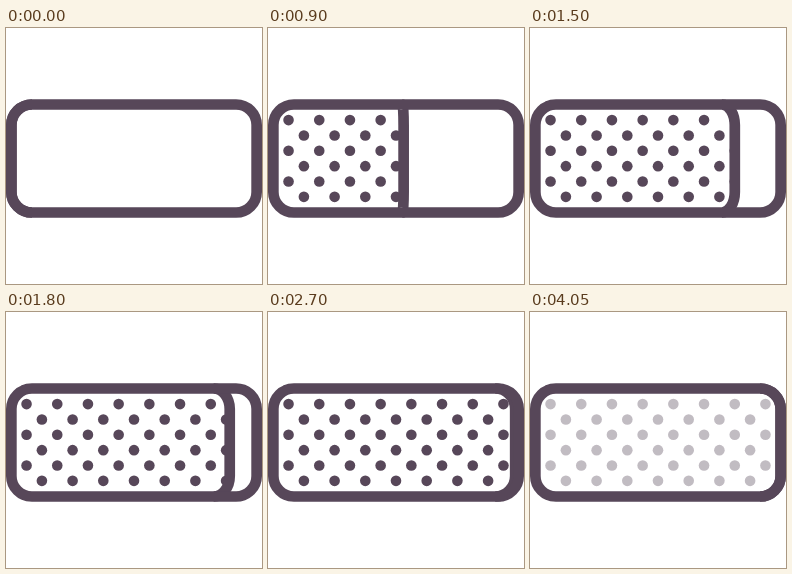
Write an HTML page that moves like this. It is 256 px wide and 256 px high and loops after 4200 ms.

```html
<!DOCTYPE html>
<html lang="en">
<head>
<meta charset="utf-8">
<title>Filling panel</title>
<style>
  html, body { margin: 0; width: 100%; height: 100%; overflow: hidden; background: #fff; }
  svg { display: block; width: 100vw; height: 100vh; }
</style>
</head>
<body>
<svg viewBox="0 0 256 256">
  <defs><clipPath id="filled"><path id="area"/></clipPath></defs>
  <g clip-path="url(#filled)"><g id="dots" fill="#574759"></g></g>
  <g fill="none" stroke="#574759" stroke-width="10.7">
    <path id="edge"/>
    <rect x="5.35" y="76.5" width="245.3" height="108" rx="20.6"/>
  </g>
</svg>
<script>
const LOOP = 4200, STEP = 150;
const LEFT = 5.35, RIGHT = 250.65, TOP = 76.5, BOTTOM = 184.5, RADIUS = 20.6;
const PITCH = 30.7;
const [area, edge, dots] = ['area', 'edge', 'dots'].map(id => document.getElementById(id));

for (let row = 0; row < 6; row++) {
  const odd = row % 2;
  for (let col = 0; col < 8 - odd; col++) {
    const dot = document.createElementNS('http://www.w3.org/2000/svg', 'circle');
    dot.setAttribute('cx', 20.55 + (col + odd / 2) * PITCH);
    dot.setAttribute('cy', 92.1 + row * PITCH / 2);
    dot.setAttribute('r', 5.3);
    dots.append(dot);
  }
}

const mix = (a, b, p) => a + (b - a) * p;

// Quintic ease-out of the fill front
function progress(t) {
  if (t < 450) return 0;
  if (t >= 3300) return 1;
  return 1 - (1 - (t - 316) / 4155) ** 5;
}

// The front bends from the left side of the frame into its right side
function front(p) {
  const x = mix(LEFT, RIGHT, p);
  const end = mix(LEFT + RADIUS, RIGHT - RADIUS, p);
  const bend = mix(end, x, 0.552);
  const k = RADIUS * 0.448;
  return `M${end} ${TOP}C${bend} ${TOP} ${x} ${TOP + k} ${x} ${TOP + RADIUS}` +
    `V${BOTTOM - RADIUS}C${x} ${BOTTOM - k} ${bend} ${BOTTOM} ${end} ${BOTTOM}`;
}

function render(time) {
  const t = Math.floor((time % LOOP) / STEP) * STEP;
  const p = progress(t);
  const d = front(p);
  edge.setAttribute('d', d);
  area.setAttribute('d', p ? `${d}H0V${TOP}Z` : '');
  dots.setAttribute('opacity', t < 3900 ? 1 : (LOOP + STEP / 6 - t) / 480);
}

const start = performance.now();
function tick() {
  render(performance.now() - start);
  requestAnimationFrame(tick);
}
tick();
</script>
</body>
</html>
```
